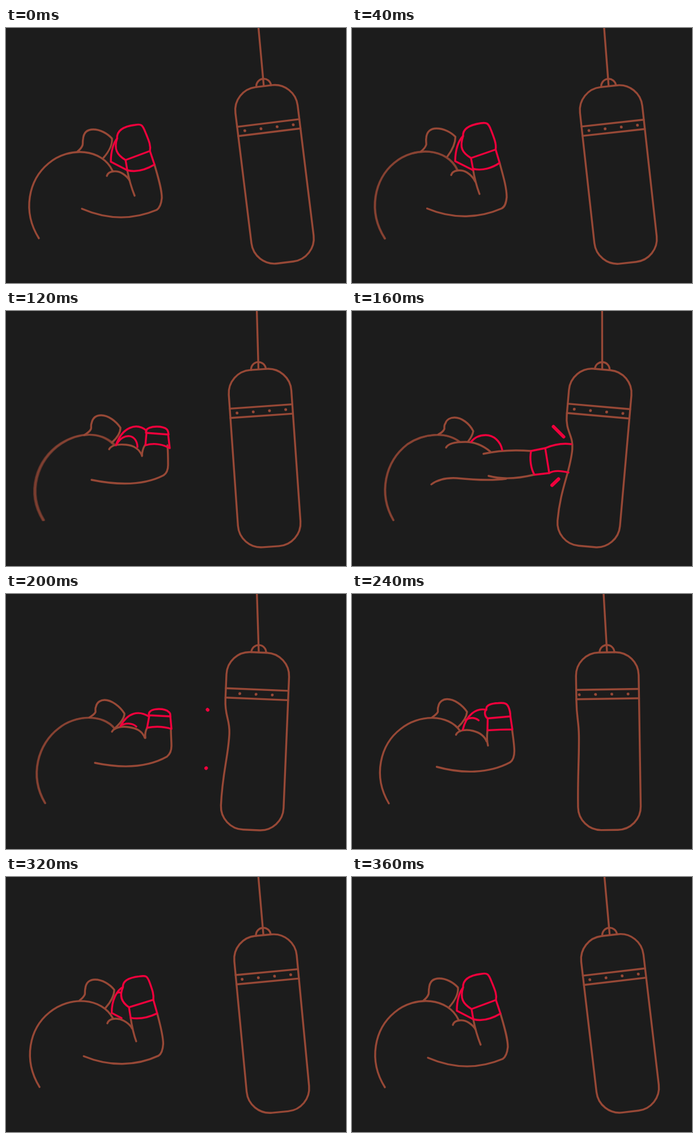
Recreate the animation shown at these times as an HTML page with a canvas. Size 600 by 450 pixels, loop 400 ms.

```html
<!DOCTYPE html>
<html lang="en">
<head>
<meta charset="utf-8">
<title>Punching bag</title>
<style>
html, body { margin: 0; width: 100%; height: 100%; overflow: hidden; background: #1c1c1c; }
canvas { display: block; width: 600px; height: 450px; }
</style>
</head>
<body>
<canvas id="stage" width="600" height="450"></canvas>
<script>
const ctx = document.getElementById('stage').getContext('2d');
const BROWN = '#974836', RED = '#f0003c', BACKGROUND = '#1c1c1c';
const STEP = 40, STEPS = 10;

// Bent-arm poses share one path structure, so any two can be blended.
const guard = {
  back: 'M58 371 C28 323 40 268 75 239 C112 208 170 213 188 252',
  head: 'M126 218 C130 215 133 212 135 207 C136 204 135 201 136 196 C137 184 144 179 154 179 C166 179 179 186 187 195 C188 206 181 219 172 229',
  arm: 'M262 241 C268 262 275 284 275 300 C274 310 272 317 266 321 C228 337 185 341 134 319',
  inner: 'M214 251 C217 267 221 281 227 296',
  chest: 'M178 261 C181 251 197 251 206 257 C212 261 216 265 218 269',
  thumb: 'M196 195 C190 202 185 217 185 236 L214 251',
  fold: 'M194 200 C194 200 194 200 194 200',
  fist: 'M196 195 C195 179 212 173 228 171 C239 169 241 171 246 184 C252 199 256 207 254 217 L211 233 C196 224 190 214 196 195',
  cuff: 'M211 233 L214 251 C230 255 247 250 262 241 L254 217'
};
const windUp = {
  back: 'M58 372 C26 323 40 265 74 237 C110 207 166 211 184 249',
  head: 'M117 218 C121 215 125 211 127 205 C127 201 125 198 126 192 C127 181 134 175.5 144 175.5 C157 175.5 170 181 178 189 C177 201 171 214 165 224',
  arm: 'M259 235 C265 258 271 279 271 297 C270 308 268 314 262 316 C224 333 175 336 131 318',
  inner: 'M213 247 C215 262 219 278 223 290',
  chest: 'M172 258 C174 248 191 248 200 253 C208 258 214 266 217 273',
  thumb: 'M196 186 C185 197 180 213 179 234 L214 251',
  fold: 'M193 193 C193 193 193 193 193 193',
  fist: 'M196 187 C194 174 210 168 226 165 C238 163 241 166 245 177 C251 193 254 203 253 212 L209 226 C192 215 189 207 196 187',
  cuff: 'M209 226 L213 246 C230 250 248 244 259 235 L253 212'
};
const swing = {
  back: 'M66 369 C36 320 54 262 97 234 C128 214 166 212 190 235',
  head: 'M138 219 C143 216 148 213 150 208 C151 203 149 203 151 198 C153 188 160 184 168 184 C180 184 194 194 202 206 C202 214 196 224 187 232',
  arm: 'M285 237 C286 250 286 262 286 272 C286 280 284 286 278 290 C245 307 200 308 151 298',
  inner: 'M245 237 C242 242 240 249 240 256',
  chest: 'M182 244 C186 236 200 235 212 236 C224 237 235 243 240 255',
  thumb: 'M248 211 C230 196 205 205 194 237 L194 237',
  fold: 'M196 234 C208 214 231 217 232 240',
  fist: 'M247 212 C248 207 256 204 266 204 C276 204 282 207 284 209 C286 211 286 213 287 218 L247 215 C247 214 247 213 247 212',
  cuff: 'M248 214 L246 237 C262 232 278 236 289 242 L286 217'
};
const recoil = {
  back: 'M69 369 C40 320 57 264 93 237 C122 213 172 211 192 238',
  head: 'M147 218 C151 215 156 213 158 208 C158 204 157 202 159 198 C161 190 168 187 174 187 C186 187 201 198 209 211 C209 218 204 226 193 236',
  arm: 'M291 238 C291 248 292 260 292 268 C292 277 289 283 284 287 C250 306 205 308 157 298',
  inner: 'M249 236 C246 242 245 248 246 254',
  chest: 'M187 243 C191 235 205 233 217 235 C230 237 240 241 245 254',
  thumb: 'M252 216 C234 205 215 209 202 233 L202 233',
  fold: 'M202 233 C210 227 222 227 230 234',
  fist: 'M252 213 C252 206 260 203 270 203 C280 203 285 206 287 208 C290 210 290 212 290 216 L252 214 C252 214 252 213 252 213',
  cuff: 'M253 214 L249 236 C264 233 279 234 292 238 L290 216'
};
const retreat = {
  back: 'M61 370 C32 322 43 267 79 239 C113 211 168 211 190 246',
  head: 'M135 218 C139 215 143 212 145 208 C146 204 144 203 146 198 C147 189 154 184 162 184 C175 184 189 194 197 205 C196 213 190 225 181 234',
  arm: 'M274 240 C277 254 281 273 281 286 C281 297 279 304 274 307 C232 329 180 326 142 312',
  inner: 'M229 246 C230 258 230 268 234 281',
  chest: 'M180 254 C183 245 198 244 210 248 C220 252 227 259 230 266',
  thumb: 'M222 193 C205 195 188 218 189 246 L189 246',
  fold: 'M199 212 C205 208 212 208 217 212',
  fist: 'M222 194 C221 185 234 183 246 182 C261 180 262 181 265 190 C268 201 269 209 269 216 L226 225 C216 217 214 203 222 194',
  cuff: 'M226 225 L229 245 C245 246 260 244 274 240 L269 216'
};
const impact = {
  back: 'M73 369 C46 322 58 266 98 235 C126 216 166 212 190 231',
  head: 'M152 218 C156 216 161 213 163 208 C163 204 162 202 165 198 C167 191 174 188 181 188 C193 188 207 198 214 212 C213 218 209 225 205 230',
  arm: 'M232 252 C258 246 290 245 316 247 M241 291 C270 299 300 294 321 289',
  inner: 'M140 306 C152 297 168 294 185 295 C215 298 245 300 272 296',
  chest: 'M166 241 C170 233 185 231 200 231 C218 231 232 238 244 248',
  thumb: 'M210 231 C218 221 228 219 236 219 C250 219 262 230 265 245',
  fist: 'M341 242 C355 236 372 233 387 235 M348 286 C356 281 366 281 382 285',
  cuff: 'M316 247 C313 262 316 279 322 289 L348 286 L341 242 Z'
};

function blend(a, b, t) {
  const mixed = {};
  for (const part in a) {
    const ends = b[part].match(/[\d.]+/g);
    let i = 0;
    mixed[part] = a[part].replace(/[\d.]+/g, n => +n + (ends[i++] - n) * t);
  }
  return mixed;
}

// Angles in degrees; dent, turn (of the rivets) and blur in pixels.
const timeline = [
  { pose: guard, rope: 5.15, tilt: 7, turn: 0.4 },
  { pose: blend(guard, windUp, 0.5), rope: 4.4, tilt: 6.3, blur: 0.5 },
  { pose: windUp, rope: 3.2, tilt: 5.4, blur: 1 },
  { pose: swing, rope: 1.6, tilt: 4, blur: 1.4 },
  { pose: impact, rope: 0.1, tilt: -5, dent: 15, blur: 0.5, spark: 1 },
  { pose: recoil, rope: 1.8, tilt: -2.4, dent: 9.5, turn: -16, blur: 0.5, spark: 0.03 },
  { pose: blend(recoil, retreat, 0.5), rope: 3.3, tilt: 0.9, dent: 3.5, turn: -7 },
  { pose: retreat, rope: 4.45, tilt: 3.5, turn: -2.5 },
  { pose: blend(retreat, guard, 0.6), rope: 4.9, tilt: 5.4, turn: -1.5 },
  { pose: guard, rope: 5.1, tilt: 6.7, turn: -0.8 }
];

function stroke(path, color, width = 3.4) {
  ctx.strokeStyle = color;
  ctx.lineWidth = width;
  ctx.stroke(new Path2D(path));
}

function drawBag({ rope, tilt, dent = 0, turn = 0 }) {
  const rad = Math.PI / 180, pivotX = 441.3, pivotY = -47, length = 150.2;
  const x = pivotX + length * Math.sin(rope * rad);
  const y = pivotY + length * Math.cos(rope * rad);
  stroke(`M${pivotX} ${pivotY} L${x} ${y - 1.5}`, BROWN);

  const w = 55.3, r = 41, h = 313.5, pressed = dent - w;
  ctx.save();
  ctx.translate(x, y);
  ctx.rotate(-tilt * rad);
  stroke('M-13 0 A13 13 0 0 1 13 0', BROWN);
  stroke(`M${-w} 85 V${r} A${r} ${r} 0 0 1 ${r - w} 0 H${w - r} A${r} ${r} 0 0 1 ${w} ${r}
    V${h - r} A${r} ${r} 0 0 1 ${w - r} ${h} H${r - w} A${r} ${r} 0 0 1 ${-w} ${h - r}
    C${-w} 215 ${pressed} 185 ${pressed} 145 C${pressed} 120 ${-w} 115 ${-w} 85`, BROWN);
  stroke(`M${-w} 65.5 H${w} M${-w} 82 H${w}`, BROWN);
  ctx.fillStyle = BROWN;
  for (let i = 0; i < 4; i++) {
    const rivet = (i - 1.5) * 28.7 + turn;
    if (Math.abs(rivet) > 52) continue;
    ctx.beginPath();
    ctx.arc(rivet, 74, 2.5, 0, 7);
    ctx.fill();
  }
  ctx.restore();
}

function drawBack(path, blur) {
  if (!blur) return stroke(path, BROWN);
  ctx.globalAlpha = 0.5;
  for (const side of [-1, 0, 1]) {
    ctx.save();
    ctx.translate(side * blur, 0);
    stroke(path, BROWN);
    ctx.restore();
  }
  ctx.globalAlpha = 1;
}

function drawBoxer({ pose, blur }) {
  drawBack(pose.back, blur);
  for (const part of ['head', 'arm', 'inner', 'chest']) stroke(pose[part], BROWN);
  for (const part of ['thumb', 'fold', 'fist', 'cuff']) if (pose[part]) stroke(pose[part], RED);
}

function drawSparks({ spark }) {
  if (!spark) return;
  stroke(`M355.5 204 l${18 * spark} ${18 * spark} M353 307.5 l${11.5 * spark} ${-11 * spark}`, RED, 6);
}

function render() {
  const scene = timeline[Math.floor(performance.now() / STEP) % STEPS];
  ctx.fillStyle = BACKGROUND;
  ctx.fillRect(0, 0, 600, 450);
  ctx.lineCap = ctx.lineJoin = 'round';
  drawBag(scene);
  drawBoxer(scene);
  drawSparks(scene);
  requestAnimationFrame(render);
}
render();
</script>
</body>
</html>
```
